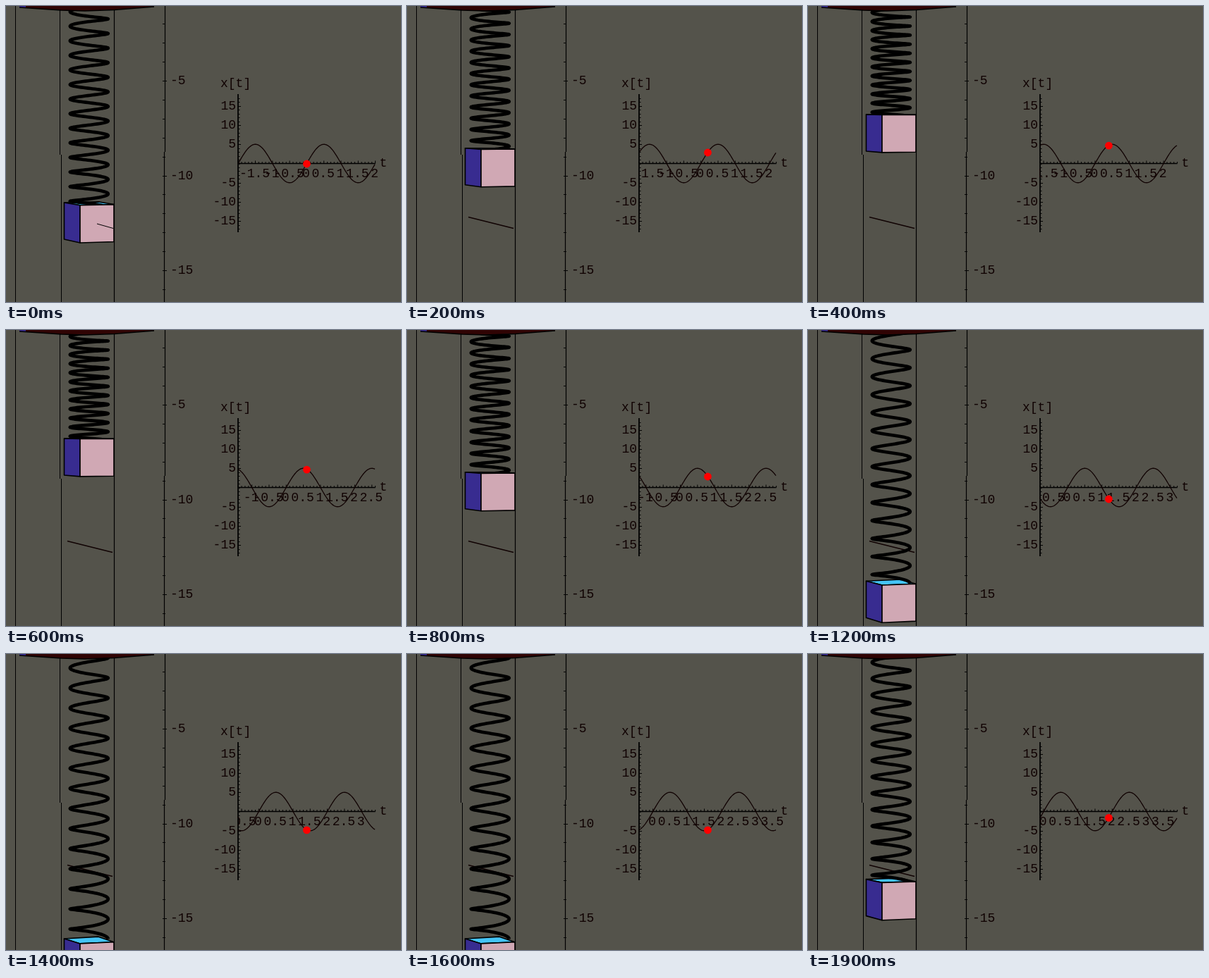
Recreate the animation shown at these times as an HTML page with a canvas. Size 560x420 px, loop 2000 ms.

```html
<!DOCTYPE html>
<html lang="en">
<head>
<meta charset="utf-8">
<title>Spring oscillator</title>
<style>
html, body { margin: 0; width: 100%; height: 100%; overflow: hidden; background: #54534b; }
canvas { display: block; }
</style>
</head>
<body>
<canvas id="stage" width="560" height="420"></canvas>
<script>
const ctx = document.getElementById('stage').getContext('2d');
const LOOP = 2000, STEP = 100;
const INK = '#100202', BLACK = '#000';
const AMP = 5;
const EYE = 130; // height at which horizontal planes are seen edge-on
const plot = { x: 329, right: 523.5, mid: 426.4, y: 223.5, perT: 48.6, perX: 5.45 };

function path(points, { fill, stroke, width = 1, close = false } = {}) {
  ctx.beginPath();
  points.forEach(([x, y]) => ctx.lineTo(x, y));
  if (close) ctx.closePath();
  if (fill) { ctx.fillStyle = fill; ctx.fill(); }
  if (stroke) {
    ctx.strokeStyle = stroke;
    ctx.lineWidth = width;
    ctx.stroke();
  }
}

const line = (x1, y1, x2, y2, width = 1, stroke = BLACK) =>
  path([[x1, y1], [x2, y2]], { stroke, width });

const face = (points, fill) =>
  path(points, { fill, stroke: BLACK, width: 1.6, close: true });

function label(text, x, y, align = 'center') {
  ctx.font = '18px "Liberation Mono", monospace';
  ctx.textAlign = align;
  ctx.fillStyle = INK;
  ctx.fillText(text, x, y + 5.5);
}

function drawGuides() {
  line(13.5, 0, 13.5, 420);
  line(76.5, 0, 76.5, 211);
  line(78.5, 211, 78.5, 420);
  line(153.5, 0, 153.5, 420, 1.2);
  line(225.5, 0, 225.5, 207, 1.2);
  line(224.5, 207, 224.5, 420, 1.2);
  for (let n = 2; n <= 16; n++) {
    const y = Math.round(106 + (n - 5) * 26.9) + 0.5;
    const major = n % 5 === 0;
    line(222, y, major ? 228 : 226, y);
    if (major) label(String(-n), 233, y - 1.5, 'left');
  }
}

function drawCeiling() {
  path([[19, 0], [19, 2], [78, 6], [112, 7], [154, 5], [210, 1], [210, 0]],
    { fill: '#300404' });
  path([[19, 0], [28, 0], [28, 3], [19, 2]], { fill: '#382c90' });
  path([[19, 2], [78, 6], [112, 7], [154, 5.5], [210, 1]], { stroke: BLACK, width: 1.6 });
}

function drawSpring(top) {
  const pitch = (top + 52) / 16;
  const points = [];
  for (let u = 0.5; u <= 15; u += 0.02) {
    const a = u * 2 * Math.PI;
    const y = -23 + u * pitch;
    const tilt = (y - EYE) / 75;
    points.push([117.8 + 27 * Math.cos(a), y + tilt * Math.sin(a)]);
  }
  ctx.lineJoin = 'round';
  path(points, { stroke: BLACK, width: 4.6 });
}

function drawMass(top) {
  // Horizontal edges tilt more the further they are below eye level.
  const left = y => [82.5, y];
  const front = y => [105, y + (y - EYE) / 40];
  const right = y => [153, front(y)[1] - (y - EYE) / 130];
  const bottom = top + 52;
  const back = [131, top - Math.max(0, top - 200) / 70];

  face([left(top), front(top), right(top), back], '#44c4f6');
  drawSpring(top);
  face([left(top), front(top), front(bottom), left(bottom)], '#382c90');
  face([front(top), right(top), right(bottom), front(bottom)], '#d0a8b4');
  if (top < 300 && bottom > 310) line(129, 309, 152, 315.5);
}

function drawAxes() {
  const { x, right, y, perX } = plot;
  line(x, 125, x, 321, 1.8);
  line(x, y, right, y, 1.6);
  for (let n = -17; n <= 17; n++) {
    const ty = Math.round(y - n * perX) + 0.5;
    const major = n !== 0 && n % 5 === 0;
    line(x, ty, x + (major ? 4 : 2.5), ty);
    if (major) label(String(n), 326, ty - 1.5, 'right');
  }
  label('x[t]', 304, 109, 'left');
  label('t', 535, 222);
}

function drawTimeScale(t) {
  const { x, mid, y, perT } = plot;
  ctx.save();
  ctx.beginPath();
  ctx.rect(x - 1, 0, 560 - x, 420);
  ctx.clip();
  const first = Math.ceil((t - 2) * 10 - 0.001);
  for (let k = first; k <= first + 40; k++) {
    const tx = mid + (k / 10 - t) * perT;
    const major = k % 5 === 0;
    line(tx, y, tx, y - (major ? 4 : 2.5));
    if (major && tx > x + 2) label(String(k / 10), tx - 1, 237);
  }
  ctx.restore();
}

const displacement = t => AMP * Math.sin(Math.PI * t);

function drawCurve(t) {
  const { x, right, mid, y, perT, perX } = plot;
  const curveY = time => y - displacement(time) * perX;
  const points = [];
  for (let px = x; px <= right; px++) points.push([px, curveY(t + (px - mid) / perT)]);
  path(points, { stroke: INK, width: 1.3 });
  ctx.beginPath();
  ctx.arc(mid, curveY(t) + 0.5, 5.4, 0, 2 * Math.PI);
  ctx.fillStyle = '#f00';
  ctx.fill();
}

function draw(ms) {
  const t = Math.floor((ms % LOOP) / STEP) * STEP / 1000;
  ctx.fillStyle = '#54534b';
  ctx.fillRect(0, 0, 560, 420);
  drawGuides();
  line(87, 299.5, 151, 315.5, 1.3, INK);
  drawMass(279 - 26.3 * displacement(t));
  drawCeiling();
  drawAxes();
  drawTimeScale(t);
  drawCurve(t);
}

const start = performance.now();
function tick() {
  draw(performance.now() - start);
  requestAnimationFrame(tick);
}
tick();
</script>
</body>
</html>
```
